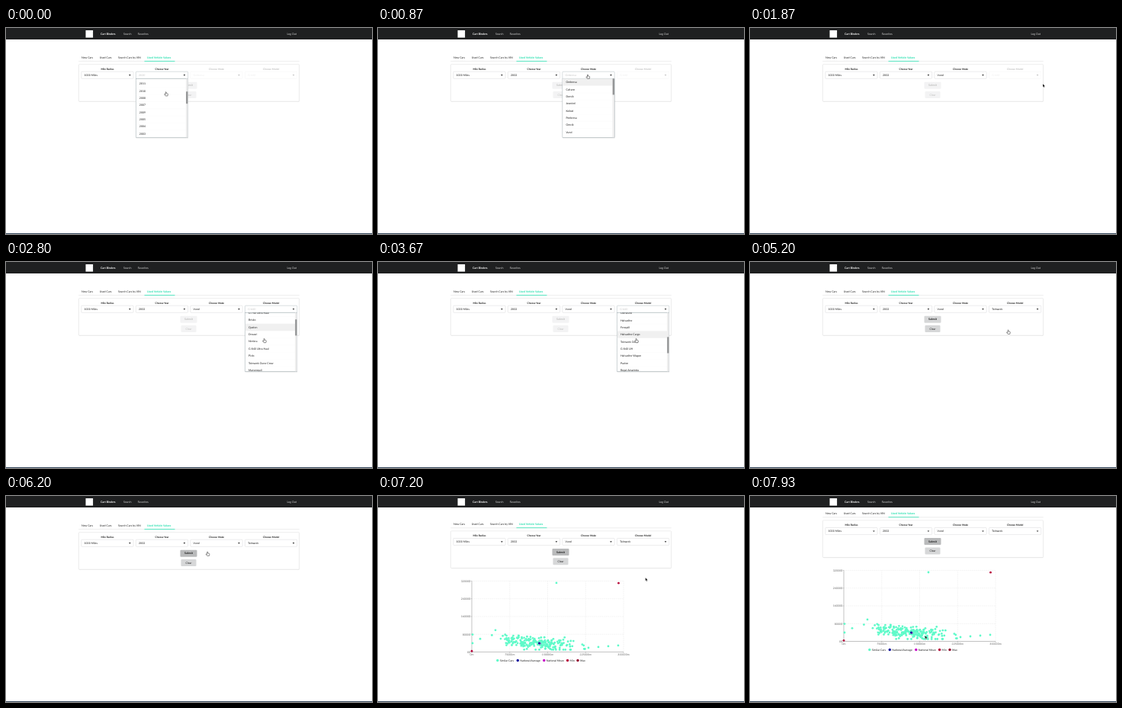
Recreate the animation shown at these times as an HTML page. Size 480x270 px, loop 8 s.

```html
<!DOCTYPE html>
<html lang="en">
<head>
<meta charset="utf-8">
<title>Vehicle values</title>
<style>
html, body { margin: 0; width: 100%; height: 100%; overflow: hidden; background: #fff; }
svg { display: block; width: 100vw; height: 100vh; }
text { font: 3.56px Lato, sans-serif; fill: #1c1c1c; }
.b { font-weight: 700; }
.label { font-size: 3.3px; font-weight: 700; }
</style>
</head>
<body>
<svg id="stage" viewBox="0 0 480 270" text-rendering="geometricPrecision"></svg>
<script>
const LOOP = 8000, ROW = 9.35, TOP = 66.3, VIEW = 77.2, SHIFT = 15.7;
const NS = 'http://www.w3.org/2000/svg';
const stage = document.getElementById('stage');

function el(parent, tag, attrs = {}, content) {
  const n = document.createElementNS(NS, tag);
  for (const k in attrs) n.setAttribute(k, attrs[k]);
  if (content !== undefined) n.textContent = content;
  parent.appendChild(n);
  return n;
}
const set = (n, k, v) => n.setAttribute(k, v);
const show = (n, on) => set(n, 'visibility', on ? 'visible' : 'hidden');
const rect = (p, x, y, width, height, fill, more) => el(p, 'rect', { x, y, width, height, fill, ...more });
const line = (p, x1, y1, x2, y2, stroke, more) =>
  el(p, 'line', { x1, y1, x2, y2, stroke, 'stroke-width': .3, ...more });
// y is the vertical middle of the text
const text = (p, x, y, s, more) => el(p, 'text', { x, y: y + 1.25, ...more }, s);
const mid = { 'text-anchor': 'middle' };

const part = (t, from, to) => Math.min(1, Math.max(0, (t - from) / (to - from)));
const smooth = u => u * u * (3 - 2 * u);

// Page
const page = el(stage, 'g');
line(page, 95.3, 43.6, 384.7, 43.6, '#cfd0d1', { 'stroke-width': .4 });
text(page, 99, 38.3, 'New Cars');
text(page, 122.7, 38.3, 'Used Cars');
text(page, 147, 38.3, 'Search Cars by VIN');
text(page, 185, 38.3, 'Used Vehicle Values', { class: 'b', style: 'fill:#22dfad' });
rect(page, 181.5, 43.1, 40, .8, '#35e3b5');
rect(page, 95.6, 48.3, 289, 48.7, '#000', { opacity: .07, rx: 1 });
rect(page, 95.4, 47.6, 289.2, 48.6, '#fff', { stroke: '#d3d4d5', 'stroke-width': .4, rx: .9 });

const buttons = el(page, 'g');
function button(y, w, label, cls) {
  const box = rect(buttons, 239.5 - w / 2, y - 4.5, w, 9, '#d6d7d8', { rx: 1 });
  text(buttons, 239.5, y, label, { ...mid, class: cls });
  return box;
}
const submit = button(75.2, 22, 'Submit', 'b');
button(87.6, 20, 'Clear', '');

const fields = ['Mile Radius', 'Choose Year', 'Choose Make', 'Choose Model'].map((name, i) => {
  const x = 98.8 + 71.55 * i, g = el(page, 'g');
  text(g, x + 34.2, 53.7, name, { ...mid, class: 'label' });
  const box = rect(g, x, 57.2, 68.3, 9.1, '#fff', { 'stroke-width': .4, rx: .9 });
  const value = text(g, x + 3.7, 61.8, '');
  el(g, 'path', { d: `M${x + 62.3} 61.1h2.6l-1.3 1.6z`, fill: '#222' });
  return { g, box, value, x };
});

const years = Array.from({ length: 40 }, (_, i) => 2020 - i - (i > 10));
years.splice(11, 3, 2008, 2007, 2009);

const heads = ['Om', 'Cal', 'Dor', 'Jes', 'Kol', 'Pen'], tails = ['breva', 'tane', 'vik', 'mirel', 'lod'];
const makes = Array.from({ length: 30 }, (_, i) => heads[i % 6] + tails[(i + Math.floor(i / 6)) % 5]);
makes[7] = 'Vund';
const models = ['G-640', 'Vellum', 'Tolmarek', 'G-740 Ultra Haul', 'Brisko', 'Quelon', 'Drovari', 'Nimbra',
  'G-840 Ultra Haul', 'Pivlo', 'Tolmarek Dune Crew', 'Marvenquil', 'Ostralune', 'Halvadine', 'Fenquill',
  'Halvadine Cargo', 'Tolmarek Dune', 'G-840 UH', 'Halvadine Wagon', 'Pavlen', 'Regal Amarinda'];
while (models.length < 30) models.push('G-' + models.length * 40);

function menu(i, items) {
  const x = fields[i].x, g = el(page, 'g');
  rect(g, x + .3, TOP + .4, 68.4, VIEW + .6, '#000', { opacity: .12 });
  rect(g, x, TOP, 68.3, VIEW, '#fff', { stroke: '#9fabb0', 'stroke-width': .5 });
  const clip = el(g, 'clipPath', { id: 'clip' + i });
  rect(clip, x, TOP, 68.3, VIEW, '#000');
  const list = el(el(g, 'g', { 'clip-path': `url(#clip${i})` }), 'g');
  const mark = rect(list, x + .3, TOP, 65.4, ROW, '#f0f0f0');
  items.forEach((s, n) => {
    line(list, x, TOP + n * ROW, x + 65.5, TOP + n * ROW, '#f6f6f6');
    text(list, x + 4.5, TOP + (n + .5) * ROW, s);
  });
  rect(g, x + 65.7, TOP + .3, 2.4, VIEW - .6, '#ededed');
  const ratio = VIEW / (items.length * ROW);
  const thumb = rect(g, x + 65.8, TOP, 2.2, VIEW * ratio, '#919293', { rx: .6 });

  // The highlighted row trails the pointer a little while the list scrolls
  return (t, open, scrollAt, hovering) => {
    const scroll = scrollAt(t), past = t - 90;
    const row = Math.floor((pointerAt(past)[1] + scrollAt(past) - TOP) / ROW);
    show(g, open);
    set(fields[i].box, 'stroke', open ? '#9fabb0' : '#cfd0d1');
    set(list, 'transform', `translate(0 ${-scroll})`);
    set(thumb, 'y', TOP + scroll * ratio);
    set(mark, 'y', TOP + row * ROW);
    set(mark, 'opacity', hovering && row >= 0 ? 1 : 0);
  };
}
const yearMenu = menu(1, years), makeMenu = menu(2, makes), modelMenu = menu(3, models);
set(fields[0].box, 'stroke', '#cfd0d1');

// Chart, placed as on the scrolled page
const chart = el(page, 'g', { transform: `translate(0 ${SHIFT})` });
const X0 = 123, X1 = 322, Y0 = 190.5, Y1 = 97.5;
for (let i = 0; i < 5; i++) {
  const x = X0 + (X1 - X0) * i / 4, y = Y0 + (Y1 - Y0) * i / 4;
  const dash = { 'stroke-dasharray': '.8 .8' };
  if (i) {
    line(chart, x, Y0, x, Y1, '#ccc', dash);
    line(chart, X0, y, X1, y, '#ccc', dash);
  }
  line(chart, x, Y0, x, Y0 + 1.5, '#666');
  line(chart, X0 - 1.5, y, X0, y, '#666');
  text(chart, x, 194.2, 75000 * i + 'm', { ...mid, style: 'fill:#666' });
  text(chart, 121, y + .2, 8000 * i + '$', { 'text-anchor': 'end', style: 'fill:#666' });
}
el(chart, 'path', { d: `M${X0} ${Y1}V${Y0}H${X1}`, fill: 'none', stroke: '#666', 'stroke-width': .4 });

const TEAL = '#5ffac9', NAVY = '#0b0b9c', PINK = '#c808c8', RED = '#b8063c', DARK = '#940a30';
const dots = [];
const dot = (x, y, fill) => dots.push(el(chart, 'circle', { cx: x, cy: y, fill }));
let seed = 29;
const rnd = () => (seed = seed * 16807 % 2147483647) / 2147483647;
const bell = () => rnd() + rnd() + rnd() + rnd() - 2;
// A falling cloud of prices, with a few cars far out on both sides
for (let i = 0; i < 215; i++) {
  const x = 211 + bell() * 42;
  dot(x, Math.min(187.5, Math.max(167, 179 + (x - 211) * .08 + bell() * 6.5)), TEAL);
}
for (let i = 0; i < 4; i++) {
  dot(124 + i * 10 * (i % 2), 179 - i * 5.7, TEAL);
  dot(276 + i * 13, 185 - i, TEAL);
}
dot(234, 100, TEAL);
dot(212, 179.4, PINK);
dot(211.4, 179, NAVY);
dot(X0, 189.3, RED);
dot(315.5, 100.2, RED);

[['Similar Cars', 155, TEAL], ['National Average', 181.5, NAVY], ['National Mean', 216, PINK],
  ['Min', 246.8, RED], ['Max', 260.2, DARK]].forEach(([s, x, fill]) => {
  el(chart, 'circle', { cx: x + 1.8, cy: 201.5, r: 1.7, fill });
  text(chart, x + 4.8, 201.5, s);
});

// Fixed bars
rect(stage, 0, 0, 480, 15, '#1f2021');
rect(stage, 0, 269, 480, 1, '#35475c');
rect(stage, 104.5, 3, 9.6, 9.6, '#fff');
const light = { style: 'fill:#dcdcdc' };
text(stage, 124, 7.3, 'Cart Binders', { class: 'b', style: 'fill:#fff' });
text(stage, 154, 7.3, 'Search', light);
text(stage, 172.8, 7.3, 'Favorites', light);
text(stage, 368.5, 7.3, 'Log Out', light);

// Pointer
const pointer = el(stage, 'g');
const arrow = el(pointer, 'path', {
  d: 'M0 0v4.2l1-.9.7 1.6.7-.3-.7-1.5h1.3z', fill: '#000', stroke: '#fff', 'stroke-width': .25
});
const hand = el(pointer, 'path', {
  d: 'M-.5.4q.5-.7 1 0v1.6l1.8.4q.5.2.4.8l-.4 2.2h-2.8l-1.5-2q0-.8.8-.4l.7.6z',
  fill: '#fff', stroke: '#222', 'stroke-width': .5
});

// Each move: start, end, and the place reached
const moves = [
  [600, 870, 275, 61],       // make field
  [1070, 1300, 275, 99.5],   // make row
  [1670, 1860, 384, 73.2],   // aside while models load
  [1980, 2220, 347, 61],     // model field
  [2300, 2470, 338.6, 100.3],
  [4720, 4950, 338.6, 89],   // model row
  [5200, 5560, 240, 73.5],   // submit
  [6130, 6200, 264.2, 73],
  [6200, 6380, 421, 84],
  [6800, 7600, 281, 130],
  [7670, 7930, 229.6, 183]
];
const pointerAt = t => moves.reduce(([x, y], [from, to, mx, my]) => {
  const u = smooth(part(t, from, to));
  return [x + (mx - x) * u, y + (my - y) * u];
}, [209.7, 83.6]);

const yearScroll = t => 82.1 + 70 * part(t, 70, 400);
const makeScroll = t => 35 * smooth(part(t, 1130, 1400));
const modelScroll = t => 95 * part(t, 2530, 3330) + 40 * part(t, 3470, 3850)
  - 75 * part(t, 3850, 4270) - 60 * part(t, 4330, 4720);

function setField(i, value, chosen, enabled) {
  const f = fields[i];
  f.value.textContent = value;
  f.value.style.fill = chosen ? '#1c1c1c' : '#c4c4c4';
  set(f.g, 'opacity', enabled ? 1 : .28);
}

function draw(t) {
  set(page, 'transform', `translate(0 ${-SHIFT * smooth(part(t, 7130, 7470))})`);

  setField(0, '1000 Miles', true, true);
  setField(1, t < 600 ? years[0] : 2002, t >= 600, true);
  setField(2, t < 1670 ? makes[0] : 'Vund', t >= 1670, t >= 670);
  setField(3, t < 5200 ? models[0] : 'Tolmarek', t >= 5200, t >= 1930);

  yearMenu(t, t < 600, yearScroll, t > 200);
  makeMenu(t, t >= 860 && t < 1670, makeScroll, true);
  modelMenu(t, t >= 2270 && t < 5200, modelScroll, t < 3850 || t > 4720);

  set(buttons, 'opacity', t >= 5200 ? 1 : .28);
  set(submit, 'fill', t >= 6130 ? '#b9babb' : t >= 5500 ? '#cacbcd' : '#d6d7d8');

  show(chart, t >= 6800);
  const r = 1.4 * part(t, 6800, 7200);
  dots.forEach(d => set(d, 'r', r));

  const [x, y] = pointerAt(t);
  const onLink = t < 640 || t > 800 && t < 1700 || t > 2150 && t < 5300 || t > 5500 && t < 6260;
  set(pointer, 'transform', `translate(${x} ${y})`);
  show(hand, onLink);
  show(arrow, !onLink);
}

const start = performance.now();
function frame() {
  draw((performance.now() - start) % LOOP);
  requestAnimationFrame(frame);
}
frame();
</script>
</body>
</html>
```
